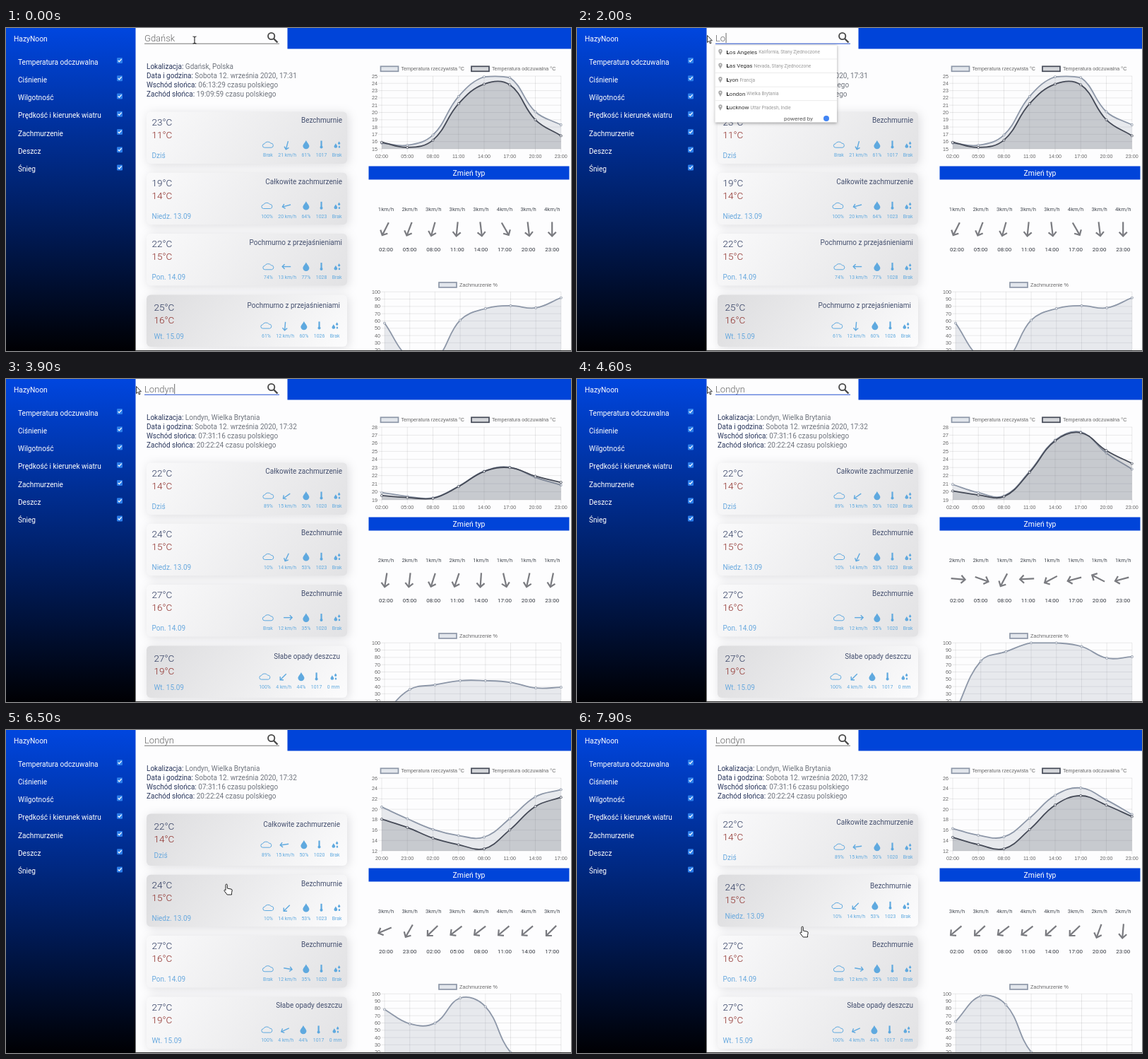
An HTML page with a canvas for the animation above (8000 ms loop, 800 px wide and 457 px high).

```html
<!DOCTYPE html>
<html lang="pl">
<head>
<meta charset="utf-8">
<title>Pogoda</title>
<style>
html, body { margin: 0; height: 100%; overflow: hidden; background: #fff; }
canvas { display: block; }
</style>
</head>
<body>
<canvas id="stage" width="800" height="457"></canvas>
<script>
const c = document.getElementById('stage').getContext('2d');
const LOOP = 8000, LOADED = 3750, PICK_TODAY = 5870, PICK_SUNDAY = 6900;
const BLUE = '#0044d9', NAVY = '#29365c', SKY = '#5fa9df', GRAY = '#6f747d';
const UI = 'Roboto, sans-serif', CHART = '"Liberation Sans", Arial, sans-serif';

const cities = [
  {
    place: 'Gdańsk, Polska', time: '17:31', rise: '06:13:29', set: '19:09:59',
    days: [
      ['23', '11', 'Bezchmurnie', ['Brak', '21 km/h', '61%', '1017', 'Brak'], 105],
      ['19', '14', 'Całkowite zachmurzenie', ['100%', '20 km/h', '64%', '1023', 'Brak'], 165],
      ['22', '15', 'Pochmurno z przejaśnieniami', ['74%', '13 km/h', '77%', '1028', 'Brak'], 180],
      ['25', '16', 'Pochmurno z przejaśnieniami', ['61%', '12 km/h', '60%', '1026', 'Brak'], 95]
    ]
  },
  {
    place: 'Londyn, Wielka Brytania', time: '17:32', rise: '07:31:16', set: '20:22:24',
    days: [
      ['22', '14', 'Całkowite zachmurzenie', ['89%', '15 km/h', '50%', '1020', 'Brak'], 145, 172],
      ['24', '15', 'Bezchmurnie', ['10%', '14 km/h', '53%', '1023', 'Brak'], 115, 135],
      ['27', '16', 'Bezchmurnie', ['Brak', '12 km/h', '35%', '1020', 'Brak'], 0, 10],
      ['27', '19', 'Słabe opady deszczu', ['100%', '4 km/h', '44%', '1017', '0 mm'], 135, 155]
    ]
  }
];
const dayNames = ['Dziś', 'Niedz. 13.09', 'Pon. 14.09', 'Wt. 15.09'];

const forecasts = [
  { at: -2000, day: 3, hour: 2, min: 15, max: 25, step: 1,
    real: [15.8, 15.5, 16.9, 22.2, 24.9, 24.8, 20.1, 18.3],
    feel: [15.9, 15.2, 16.2, 21.2, 23.9, 23.8, 19, 16.8],
    cloud: [57, 9, 7, 61, 77, 81, 78, 92],
    wind: [1, 2, 3, 3, 3, 4, 3, 4], dir: [117, 111, 106, 96, 83, 60, 83, 90] },
  { at: LOADED, day: 3, hour: 2, min: 19, max: 28, step: 1,
    real: [20.9, 19.9, 19.5, 22.5, 26.4, 27.4, 24.8, 22.8],
    feel: [20.1, 19.6, 19.4, 22.4, 26.3, 27.3, 25.1, 23.5],
    cloud: [6, 75, 88, 100, 100, 95, 79, 81],
    wind: [2, 2, 1, 2, 1, 1, 1, 1], dir: [5, 20, 118, 177, 152, 165, 207, 165] },
  { at: PICK_TODAY, day: 0, hour: 20, min: 12, max: 26, step: 2,
    real: [20.6, 18.3, 16.2, 15, 14.7, 18.3, 22.6, 24],
    feel: [18.2, 16.6, 14.5, 13.2, 12.4, 16.1, 20.7, 22.5],
    cloud: [80, 60, 61, 96, 84, 20, 0, 0],
    wind: [3, 3, 3, 3, 4, 4, 4, 3], dir: [157, 120, 136, 143, 143, 140, 140, 135] },
  { at: PICK_SUNDAY, day: 1, hour: 2, min: 12, max: 26, step: 2,
    real: [16.3, 15, 14.7, 18.3, 22.7, 24.1, 21.8, 19],
    feel: [14.6, 13.2, 12.4, 16.1, 20.8, 22.6, 20.8, 18.6],
    cloud: [62, 97, 85, 20, 0, 0, 0, 0],
    wind: [3, 3, 4, 4, 4, 3, 2, 2], dir: [140, 137, 143, 143, 138, 136, 110, 95] }
];

const hints = [
  { at: 1700, bold: 1, rows: [['Los Angeles', 'Kalifornia, Stany Zjednoczone'], ['Las Vegas', 'Nevada, Stany Zjednoczone'],
    ['Lyon', 'Francja'], ['London', 'Wielka Brytania'], ['Lucknow', 'Uttar Pradesh, Indie']] },
  { at: 2900, bold: 6, rows: [['Londyn', 'Wielka Brytania'], ['Vrbolínká', 'Vinohrady, Czechy'],
    ['Wierzbola', 'Warszawa, Polska'], ['Wierzbola', 'Gorzów Wielkopolski, Polska'], ['Vrbolínké náměstí', 'Brno-střed, Czechy']] }
];
const keys = [1500, 1900, 2200, 2400, 2600, 2800];
const mouse = [[0, 267, 17], [400, 267, 17], [900, 184, 10], [4700, 184, 10], [5500, 282, 141],
  [5950, 282, 141], [6400, 311, 218], [7000, 311, 218], [7800, 318, 278], [LOOP, 318, 278]];

const clamp = x => Math.max(0, Math.min(1, x));
const mix = (a, b, p) => a + (b - a) * p;
const smooth = (t, start, time) => { const x = clamp((t - start) / time); return x * x * (3 - 2 * x); };

function text(s, x, y, size, color, align = 'left', weight = 400, font = UI) {
  c.font = `${weight} ${size}px ${font}`;
  c.fillStyle = color;
  c.textAlign = align;
  c.fillText(s, x, y + size * .36);
  return c.measureText(s).width;
}
function box(x, y, w, h, fill) {
  c.fillStyle = fill;
  c.fillRect(x, y, w, h);
}
function line(points, color, width) {
  c.beginPath();
  points.forEach(p => c.lineTo(...p));
  c.strokeStyle = color;
  c.lineWidth = width;
  c.stroke();
}
function dot(x, y, r, fill) {
  c.beginPath();
  c.arc(x, y, r, 0, 7);
  c.fillStyle = fill;
  c.fill();
}
function shape(x, y, path, fill, stroke, width = 1) {
  c.save();
  c.translate(x, y);
  const p = new Path2D(path);
  if (fill) { c.fillStyle = fill; c.fill(p); }
  if (stroke) { c.strokeStyle = stroke; c.lineWidth = width; c.stroke(p); }
  c.restore();
}
// The glyph sits slightly ahead of its turning point
function arrow(x, y, deg, len, width, color) {
  const tip = len * .58, k = len * .28;
  c.save();
  c.translate(x, y);
  c.rotate(deg * Math.PI / 180);
  line([[tip - len, 0], [tip, 0]], color, width);
  line([[tip - k, -k], [tip, 0], [tip - k, k]], color, width);
  c.restore();
}
function drop(x, y, s) {
  shape(x, y, `M0 ${-s}C${s * .3} ${-s * .4} ${s * .75} 0 ${s * .75} ${s * .35}A${s * .75} ${s * .7} 0 0 1 ${-s * .75} ${s * .35}C${-s * .75} 0 ${-s * .3} ${-s * .4} 0 ${-s}Z`, SKY);
}

function sidebar() {
  const g = c.createLinearGradient(0, 0, 0, 457);
  g.addColorStop(0, '#0046df');
  g.addColorStop(1, '#000003');
  box(0, 0, 183.5, 457, g);
  text('HazyNoon', 11, 15, 10.3, '#fff');
  ['Temperatura odczuwalna', 'Ciśnienie', 'Wilgotność', 'Prędkość i kierunek wiatru', 'Zachmurzenie', 'Deszcz', 'Śnieg']
    .forEach((s, i) => {
      const y = 48 + i * 25.25;
      text(s, 17, y, 10.1, '#fff');
      c.beginPath();
      c.roundRect(157, y - 6, 8, 8, 1.2);
      c.fillStyle = '#2b7de9';
      c.fill();
      line([[158.7, y - 2], [160.4, y - .3], [163.6, y - 4.2]], '#fff', 1.2);
    });
}

function search(t) {
  const focused = t > 400 && t < PICK_TODAY;
  const typed = keys.filter(k => k <= t);
  const value = typed.length ? 'Londyn'.slice(0, typed.length) : 'Gdańsk';
  c.font = `300 13px ${UI}`;
  const end = 196 + c.measureText(value).width;
  if (focused && !typed.length) {
    const from = Math.max(196, mix(267, 184, smooth(t, 400, 500)));
    if (from < end) box(from, 6, end - from, 15, '#a8c7fa');
  }
  text(value, 196, 14, 13, '#666', 'left', 300);
  if (focused && typed.length && (t - typed.at(-1)) % 1060 < 530) box(end + .5, 7, .8, 14, '#444');
  box(196, 21.7, 191, 1, focused ? '#2450d0' : '#777');
  c.beginPath();
  c.arc(375.7, 11.5, 4.6, 0, 7);
  c.strokeStyle = '#4a4a4a';
  c.lineWidth = 1.9;
  c.stroke();
  line([[379, 15], [384.5, 20.5]], '#4a4a4a', 2.4);
}

function summary(city) {
  [['Lokalizacja: ', city.place], ['Data i godzina: ', 'Sobota 12. września 2020, ' + city.time],
    ['Wschód słońca: ', city.rise + ' czasu polskiego'], ['Zachód słońca: ', city.set + ' czasu polskiego']]
    .forEach(([label, value], i) => {
      const y = 54.5 + i * 13;
      const w = text(label, 199, y, 10, NAVY);
      text(value, 199 + w, y, 10, GRAY);
    });
}

function icon(kind, x, y, deg) {
  if (kind === 0) shape(x, y, 'M-4.8 4.2A2.7 2.7 0 0 1 -5 -1.2A5 4.2 0 0 1 4 -1.9A3.1 3.1 0 0 1 5 4.2Z', null, SKY, 1);
  if (kind === 1) arrow(x, y, deg, 12, 1.4, SKY);
  if (kind === 2) drop(x, y, 6);
  if (kind === 3) { box(x - 1.1, y - 5.5, 2.2, 9, SKY); dot(x, y + 3.5, 2, SKY); }
  if (kind === 4) { drop(x - 1.8, y + 1.5, 3.2); drop(x + 3, y - 2.5, 2.2); drop(x + 3.3, y + 2.8, 1.7); }
}

function card(i, day, active, lit, t) {
  const y = 118.5 + i * 86.3, pad = 3 * active;
  const g = c.createLinearGradient(230, y - 45, 452, y + 119);
  g.addColorStop(0, lit ? '#dcdcde' : '#fafafb');
  g.addColorStop(1, lit ? '#fcfcfd' : '#e2e2e4');
  c.save();
  c.shadowColor = 'rgba(90,90,100,.2)';
  c.shadowBlur = 14;
  c.shadowOffsetX = c.shadowOffsetY = 2;
  c.beginPath();
  c.roundRect(199, y, 284, 73.5, 6);
  c.fillStyle = g;
  c.fill();
  c.restore();

  const left = 206.5 + pad, right = 476 - pad, top = y + pad, bottom = y - pad;
  text(day[0] + '°C', left, top + 14.5, 13.5, NAVY, 'left', 300);
  text(day[1] + '°C', left, top + 32.5, 13.5, '#8c2a25', 'left', 300);
  text(dayNames[i], left, bottom + 61.5, 10, '#69a9de');
  text(day[2], right, top + 12.3, 10, '#45506f', 'right');

  const deg = mix(day[4], day[5] ?? day[4], smooth(t, 4600, 700));
  let edge = right - .5;
  for (let k = 4; k >= 0; k--) {
    c.font = `400 6.9px ${UI}`;
    const w = c.measureText(day[3][k]).width, x = edge - w / 2;
    icon(k, x, bottom + 46.5, deg);
    text(day[3][k], x, bottom + 61.3, 6.9, SKY, 'center');
    edge -= w + 7.5;
  }
}

// Smoothed line with control points kept inside the plot
function curve(values, x0, dx, toY, top, base, color, fill) {
  const pts = values.map((v, i) => [x0 + i * dx, toY(v)]);
  const ctrl = pts.map((p, i) => {
    const a = pts[i - 1] || p, b = pts[i + 1] || p;
    const d0 = Math.hypot(p[0] - a[0], p[1] - a[1]), d1 = Math.hypot(b[0] - p[0], b[1] - p[1]);
    const side = k => [p[0] + k * (b[0] - a[0]), Math.max(top, Math.min(base, p[1] + k * (b[1] - a[1])))];
    return [side(-.4 * d0 / (d0 + d1)), side(.4 * d1 / (d0 + d1))];
  });
  const trace = () => {
    c.beginPath();
    c.moveTo(...pts[0]);
    for (let i = 1; i < pts.length; i++) c.bezierCurveTo(...ctrl[i - 1][1], ...ctrl[i][0], ...pts[i]);
  };
  trace();
  c.lineTo(pts.at(-1)[0], base);
  c.lineTo(x0, base);
  c.fillStyle = fill;
  c.fill();
  trace();
  c.strokeStyle = color;
  c.lineWidth = 1.8;
  c.stroke();
  pts.forEach(p => { dot(...p, 1.9, color); dot(...p, 1.2, '#e4e6ea'); });
}

function legend(x, y, label, color, fill) {
  box(x, y, 25, 7, fill);
  c.strokeStyle = color;
  c.lineWidth = 1.7;
  c.strokeRect(x, y, 25, 7);
  text(label, x + 29, y + 3.5, 7.2, '#666', 'left', 400, CHART);
}

function chartGrid(x0, dx, top, bottom, min, max, step) {
  const toY = v => mix(bottom, top, (v - min) / (max - min));
  for (let v = min; v <= max; v += step) {
    const y = toY(v);
    line([[x0 - 5, y], [786, y]], 'rgba(0,0,0,.12)', .7);
    text(v, x0 - 6, y, 7.2, '#666', 'right', 400, CHART);
  }
  for (let i = 0; i < 8; i++) line([[x0 + i * dx, top], [x0 + i * dx, bottom + 5]], 'rgba(0,0,0,.12)', .7);
  return toY;
}

function charts(t, now, before) {
  const p = 1 - (1 - clamp((t - now.at) / 1000)) ** 4;
  const grow = (values, base) => values.map(v => mix(base, v, p));
  const hour = i => String((now.hour + 3 * i) % 24).padStart(2, '0') + ':00';
  const slate = '#8d97a8', dark = '#454a57';

  legend(530.5, 54.3, 'Temperatura rzeczywista °C', slate, '#e2e6ec');
  legend(659, 54.3, 'Temperatura odczuwalna °C', dark, '#d4d6da');
  const toY = chartGrid(532, 36.25, 68, 171, now.min, now.max, now.step);
  curve(grow(now.real, now.min), 532, 36.25, toY, 68, 171, slate, 'rgba(141,151,168,.2)');
  curve(grow(now.feel, now.min), 532, 36.25, toY, 68, 171, dark, 'rgba(69,74,87,.2)');

  box(513.5, 195.5, 284, 19, BLUE);
  text('Zmień typ', 655.5, 205, 10.4, '#fff', 'center');

  const turn = smooth(t, now.at, 600);
  for (let i = 0; i < 8; i++) {
    const x = 538 + i * 33.6;
    text(hour(i), 532 + i * 36.25, 181.5, 7.2, '#666', 'center', 400, CHART);
    text(now.wind[i] + 'km/h', x, 256, 7.7, '#454a52', 'center');
    arrow(x, 282.8, mix(before.dir[i], now.dir[i], turn), 20, 2.2, '#7a7b80');
    text(hour(i), x, 313.5, 8, '#33373f', 'center');
  }

  legend(613, 360, 'Zachmurzenie %', slate, '#e2e6ec');
  const cloudY = chartGrid(536, 35.7, 373.3, 476.3, 0, 100, 10);
  curve(grow(now.cloud, 0), 536, 35.7, cloudY, 373.3, 476.3, slate, 'rgba(141,151,168,.2)');
}

function dropdown(t) {
  const list = hints.filter(h => h.at <= t).at(-1);
  if (!list || t > 3500) return;
  c.save();
  c.shadowColor = 'rgba(0,0,0,.35)';
  c.shadowBlur = 4;
  c.shadowOffsetY = 1;
  box(195.5, 24, 172.5, 109.5, '#fff');
  c.restore();
  list.rows.forEach(([name, place], i) => {
    const y = 34 + i * 19.6;
    box(195.5, y - 10, 172.5, .7, '#e3e3e3');
    shape(203, y, 'M0 4.5C-1 2 -2.7 .5 -2.7 -1.5A2.7 2.7 0 0 1 2.7 -1.5C2.7 .5 1 2 0 4.5Z', '#a8a8a8');
    dot(203, y - 1.5, .9, '#fff');
    let x = 211.5;
    x += text(name.slice(0, list.bold), x, y, 8, '#111', 'left', 700);
    x += text(name.slice(list.bold), x, y, 8, '#333');
    text(place, x + 2, y, 6.6, '#999');
  });
  text('powered by', 293, 128, 8, '#555');
  dot(353, 128, 4, '#4285f4');
}

function pointer(t) {
  const i = mouse.findIndex(m => m[0] > t), [t0, x0, y0] = mouse[i - 1], [t1, x1, y1] = mouse[i];
  const p = smooth(t, t0, t1 - t0), x = mix(x0, x1, p), y = mix(y0, y1, p);
  const onCard = x > 199 && x < 483 ? [0, 1, 2, 3].find(k => y >= 118 + k * 86.3 && y <= 193 + k * 86.3) : undefined;
  const draw = () => {
    if (onCard !== undefined)
      shape(x, y, 'M0 1.2C0 -.3 2.3 -.3 2.3 1.2V6L8 7.2Q9.3 7.6 9.2 9L8.5 12.5V15H2.2L-1.8 9.8C-2.8 8.4 -1.2 7.6 0 9Z', '#fff', '#222', 1);
    else if (y < 24 && x > 195 && x < 368)
      shape(x, y, 'M-2.5 -5Q0 -5 0 -3.5Q0 -5 2.5 -5M0 -3.5V3.5M-2.5 5Q0 5 0 3.5Q0 5 2.5 5', null, '#222', 1.1);
    else
      shape(x, y, 'M.5 .5V10.5L2.8 8.4L4.4 12L6 11.3L4.4 7.8H7.4Z', '#fff', '#222', .9);
  };
  return { onCard, draw };
}

function draw(t) {
  const n = forecasts.filter(f => f.at <= t).length - 1, now = forecasts[n], before = forecasts[n - 1] || now;
  const city = cities[t < LOADED ? 0 : 1], cursor = pointer(t);
  box(0, 0, 800, 457, '#fdfdfe');
  box(398.5, 0, 401.5, 29.5, BLUE);
  sidebar();
  search(t);
  summary(city);
  const shift = smooth(t, now.at, 300);
  city.days.forEach((day, i) => {
    const active = mix(+(before.day === i), +(now.day === i), shift);
    card(i, day, active, active > .5 || cursor.onCard === i, t);
  });
  charts(t, now, before);
  dropdown(t);
  box(183, 456, 617, 1, '#333');
  cursor.draw();
}

function tick() {
  draw(performance.now() % LOOP);
  requestAnimationFrame(tick);
}
tick();
</script>
</body>
</html>
```
